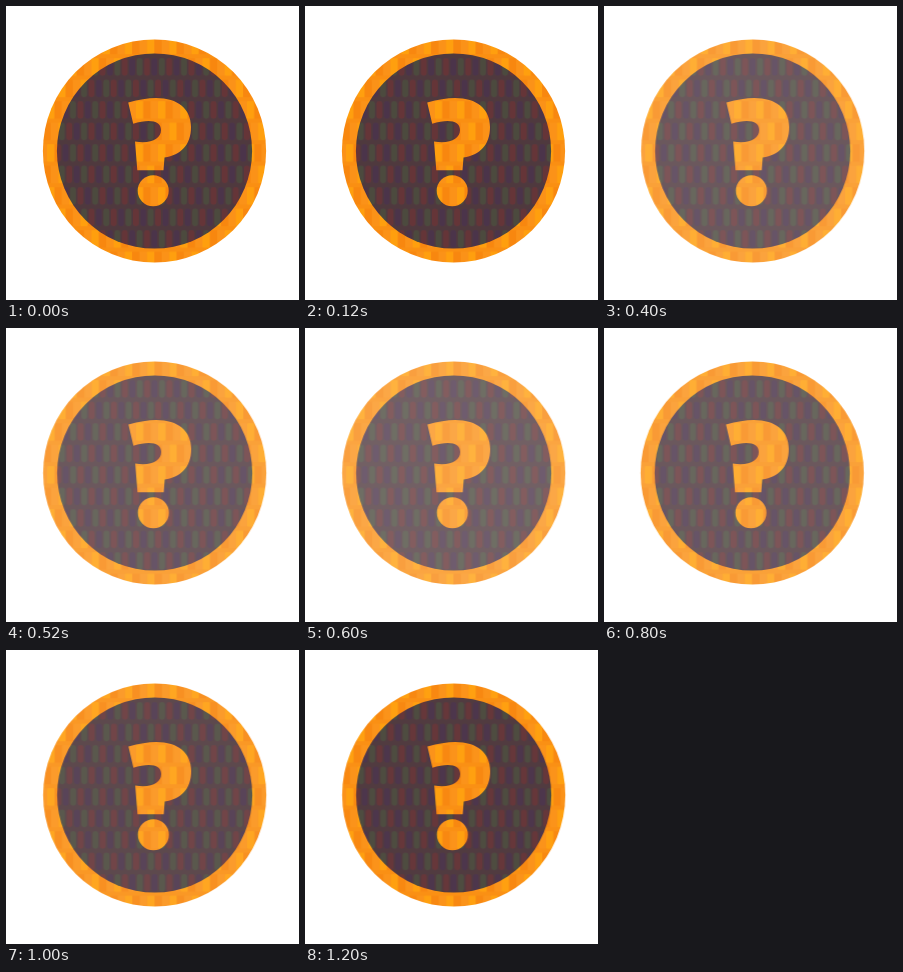
Write an HTML page that moves like this. It is 293 px wide and 294 px high and loops after 1.4 s.

```html
<!DOCTYPE html>
<html lang="en">
<head>
<meta charset="utf-8">
<title>Pulsing question badge</title>
<style>
  html, body { margin: 0; width: 100%; height: 100%; overflow: hidden; background: #fff; }
  svg { display: block; width: 100%; height: 100%; }
</style>
</head>
<body>
<svg viewBox="0 0 293 294" preserveAspectRatio="none">
  <defs id="defs"></defs>
  <g id="badge">
    <circle cx="148.5" cy="145" r="111.6" fill="url(#warm)"/>
    <circle cx="148.5" cy="145" r="97.6" fill="url(#dark)"/>
    <g fill="url(#warm)">
      <path d="M122.2 96.5 Q138 92 150 92 C172 92 185 103 185 121 C185 139 175 149 158.5 151.5 L157.5 164.2 H131.3 L129 135.5 C145 138 155 133 155 124 C155 115 144 112.5 127.2 117.8 Z"/>
      <circle cx="147.2" cy="184.7" r="15.5"/>
    </g>
  </g>
</svg>
<script>
  const NS = "http://www.w3.org/2000/svg";
  const PITCH = 22.2, ROW = 21.5, BAR = PITCH / 3;

  function add(parent, tag, attrs) {
    const el = document.createElementNS(NS, tag);
    for (const key in attrs) el.setAttribute(key, attrs[key]);
    return parent.appendChild(el);
  }

  // Slot mask: triads of bars, every second row shifted by half a triad.
  function slotMask(id, base, colors, gap, radius) {
    const tile = add(document.getElementById("defs"), "pattern", {
      id, x: 85.5, y: 93.2, width: PITCH, height: ROW * 2,
      patternUnits: "userSpaceOnUse"
    });
    add(tile, "rect", { width: PITCH, height: ROW * 2, fill: base });
    for (let row = 0; row < 2; row++) {
      for (let i = -3; i < 6; i++) {
        add(tile, "rect", {
          x: i * BAR + row * PITCH / 2 + gap / 2,
          y: row * ROW + 2,
          width: BAR - gap, height: ROW - 4,
          rx: radius, fill: colors[(i + 3) % 3]
        });
      }
    }
  }

  slotMask("dark", "#4f393e", ["#4c4a3e", "#653538", "#4b344a"], 1.6, 2.4);
  slotMask("warm", "#fa8f12", ["#ff9f0e", "#f8870f", "#fb9218"], 0, 0.8);

  // Opacity and sideways shake per step.
  const steps = [
    [1, 0], [0.9, -0.4], [0.84, 0.2], [0.8, 0.2],
    [0.84, -0.3], [0.92, 0.2], [0.99, 0.2]
  ];
  const frames = [...steps, steps[0]].map(([opacity, dx], i) => ({
    offset: i / steps.length,
    opacity,
    transform: `translateX(${dx}px)`,
    easing: "steps(1, end)"
  }));
  document.getElementById("badge").animate(frames, { duration: 1400, iterations: Infinity });
</script>
</body>
</html>
```
